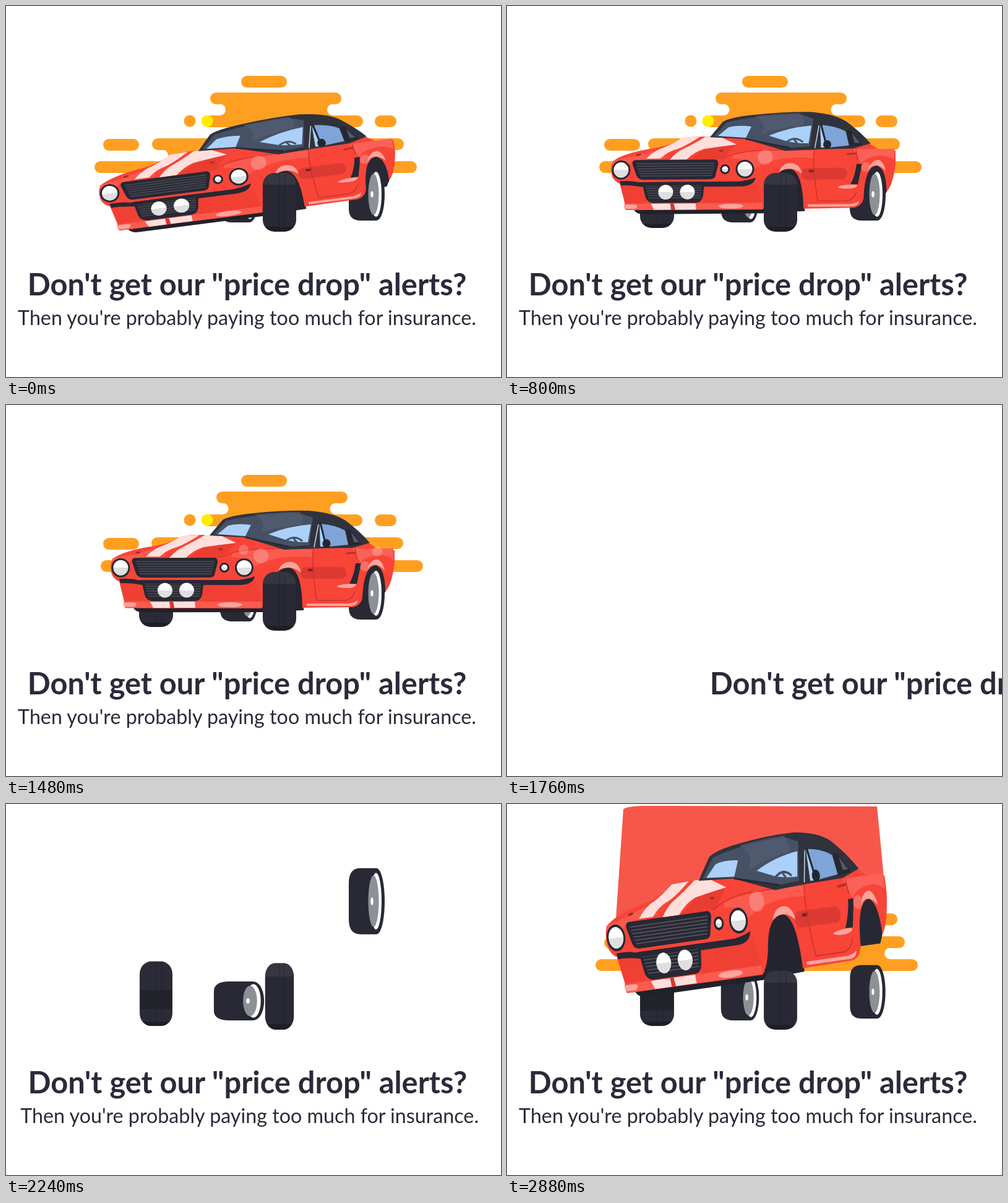
Recreate the animation shown at these times as an HTML page. Size 800 px wide and 600 px high, loop 2920 ms.

```html
<!DOCTYPE html>
<html lang="en">
<head>
<meta charset="utf-8">
<title>Price drop alerts</title>
<style>
html, body { margin: 0; width: 100%; height: 100%; overflow: hidden; background: #fff }
svg { display: block; width: 800px; height: 600px }
text { font-family: Lato, sans-serif; fill: #2b2a3a; text-anchor: middle }
</style>
</head>
<body>
<svg viewBox="0 0 800 600">
<defs>
  <clipPath id="stage"><path d="M0 2H800V600H0Z"/></clipPath>
  <linearGradient id="near" x2="0" y2="1">
    <stop offset=".2" stop-color="#363641"/><stop offset=".2" stop-color="#282934"/>
    <stop offset=".92" stop-color="#282934"/><stop offset=".92" stop-color="#1e1e28"/>
  </linearGradient>
  <linearGradient id="far" x2="0" y2="1">
    <stop offset=".44" stop-color="#2a2b36"/><stop offset=".44" stop-color="#23232c"/>
    <stop offset=".74" stop-color="#23232c"/><stop offset=".74" stop-color="#2a2b36"/>
    <stop offset=".93" stop-color="#2a2b36"/><stop offset=".93" stop-color="#1e1e28"/>
  </linearGradient>
  <linearGradient id="lamp" x2="0" y2="1">
    <stop offset=".5" stop-color="#fff"/><stop offset=".5" stop-color="#e0dfe0"/>
  </linearGradient>
  <pattern id="slats" width="10" height="4" patternUnits="userSpaceOnUse">
    <path d="M0 1H10" stroke="#62616b"/>
  </pattern>
</defs>
<g clip-path="url(#stage)">
  <g id="cloud" fill="#ff9f21"></g>
  <path id="trail" fill="#f7574b"/>
  <g class="car"><path fill="#272833" d="M573 312V285Q578 256 598 256Q614 262 614 300L608 312Z"/></g>
  <g id="backWheels"></g>
  <g class="car">
    <path fill="#20212b" d="M205 326H432V329L414 335H222Q208 335 205 326Z"/>
    <path fill="#24252f" d="M416 334Q420 258 456 258Q481 260 481 332Z"/>
    <path fill="#f94438" d="M330 210Q300 209 284 212Q264 225 232 229Q190 236 173 248Q167 258 171 274Q176 283 183 285L191 317Q188 324 193 328L413 329Q423 320 427 300Q432 264 456 263Q478 264 479 328L560 327Q573 325 576 312Q578 260 598 259Q613 265 613 302Q624 290 628 255V235L601 233L586 223L497 222L370 205Z"/>
    <!-- shading -->
    <path fill="#fb5b4f" d="M172 248Q215 240 235 233L260 243Q230 244 205 248L198 254Q186 245 172 253Z"/>
    <path fill="#fb5b4f" d="M365 240Q420 229 497 234V246Q440 240 400 262Q390 245 365 246Z"/>
    <path fill="#fb6156" d="M560 232H626V250Q611 240 594 244Q578 247 572 256Q566 241 560 232Z"/>
    <path fill="#e93b31" d="M185 286L222 289L226 316H191ZM318 289L390 289Q402 289 404 283L413 318H316Z" opacity=".55"/>
    <path fill="#fba59d" d="M440 268Q446 252 462 254Q475 257 477 272Q468 263 457 263Q447 263 440 268ZM584 265Q590 248 602 250Q609 254 612 268Q602 257 594 259Q588 260 584 265Z"/>
    <!-- hood -->
    <path fill="#e23a31" d="M350 247Q362 232 372 223L345 212Q320 232 294 247Z" opacity=".65"/>
    <path fill="#ffdfdc" d="M285 211L313 210Q288 226 275 230Q260 234 249 245H226Q238 233 249 229Q264 224 285 211ZM322 210H345L372 223Q338 227 319 230Q303 235 291 247H264Q275 234 287 229Q302 222 322 210Z"/>
    <path fill="none" stroke="#c8342d" d="M346 247Q370 235 400 233L497 232"/>
    <path stroke="#a52d2a" stroke-width="3" stroke-linecap="round" d="M211 239L216 238M345 233H349"/>
    <!-- cabin -->
    <path fill="#30333d" d="M329 211L350 186Q360 179 400 175Q450 170 490 171Q529 174 549 187Q573 205 588 223L560 231L497 232L450 234L385 214Z"/>
    <path fill="#465165" d="M336 209L356 187Q402 176 475 175L496 182L490 227L455 229L388 213Z"/>
    <path fill="#566073" opacity=".65" d="M402 177Q444 173 474 173Q485 185 478 193Q440 196 411 207Q424 190 402 177Z"/>
    <path fill="#abd1fa" d="M342 209L359 195Q374 191 396 194L387 212ZM424 209Q455 196 493 193L488 222Q468 222 452 218Z"/>
    <path fill="none" stroke="#465165" stroke-width="3" d="M452 220Q466 209 479 220M465 216L470 222"/>
    <path stroke="#262730" stroke-width="2" d="M386 214L458 229"/>
    <path fill="#7fa5d8" d="M507 192Q532 194 548 203L553 226L522 229H508Z"/>
    <path fill="#abd1fa" d="M507 196L517 224L522 229H508Z"/>
    <path fill="none" stroke="#c6d9ec" stroke-width="1.5" d="M505 193L498 230"/>
    <path stroke="#262730" stroke-width="3" d="M508 190L516 223"/>
    <ellipse cx="518" cy="224" rx="6.500" ry="7" fill="#262730"/>
    <path fill="#262730" d="M549 201L556 201L575 225L555 228Z"/>
    <path fill="#525968" d="M558 206L571 222L562 222Z"/>
    <!-- side -->
    <rect x="476" y="262" width="74" height="19" rx="9" fill="#dc3a32"/>
    <path fill="#7d2529" d="M488 265H498L496 269H488Z"/>
    <path fill="none" stroke="#c8342d" stroke-width="1.5" d="M497 232Q493 255 502 316H548Q561 314 564 302M564 232L567 250"/>
    <path stroke="#b8302b" stroke-width="3" stroke-linecap="round" d="M551 240L564 239"/>
    <path fill="#262833" d="M565 256H574L567 289H555Q563 274 565 256Z"/>
    <path fill="#fba59d" d="M534 293Q548 288 566 290Q565 296 550 296Q537 296 534 293ZM486 321H553Q564 320 568 316Q568 325 555 325H486Z"/>
    <!-- front -->
    <path fill="#272833" d="M183 281Q203 280 213 283H375Q393 281 402 277Q400 290 380 291H222Q198 287 185 288Z"/>
    <path fill="#272833" d="M208 247H338Q343 249 342 255L337 275Q335 279 328 279H221Q213 279 210 272L204 254Q203 248 208 247Z"/>
    <path fill="url(#slats)" d="M209 251H337L332 275H217Z"/>
    <path fill="#272833" d="M219 283H320L317 307Q315 317 305 317H237Q226 316 224 306Z"/>
    <path fill="url(#slats)" d="M224 289H315L313 310H230Z"/>
    <g fill="url(#lamp)">
      <circle cx="257" cy="299.500" r="12"/><circle cx="292" cy="299.500" r="12"/>
      <g stroke="#272833" stroke-width="3">
        <ellipse cx="185.500" cy="263" rx="13.500" ry="14"/><circle cx="385" cy="263" r="13.500"/>
        <circle cx="353" cy="263" r="6.500"/>
      </g>
    </g>
    <path fill="#fb5b4f" d="M193 318H413V328H193Z"/>
    <path fill="#ffdfdc" d="M233 318H265V328H238ZM270 318H305L306 328H272Z"/>
    <path fill="#d9362f" d="M264 318H270L272 328H266Z"/>
    <path fill="#fba59d" d="M191 319H207Q215 321 207 326H192Q188 323 191 319Z"/>
    <ellipse cx="362" cy="323" rx="20" ry="4" fill="#fba59d"/>
    <g fill="#fff" opacity=".22">
      <circle id="glint" cx="418" cy="244" r="12"/><circle cx="580" cy="261" r="8"/>
      <g id="late"><circle cx="384" cy="234" r="8"/><circle cx="600" cy="237" r="8"/><circle cx="412" cy="244" r="5"/></g>
    </g>
  </g>
  <g id="frontWheel"></g>
</g>
<text id="head" y="467.500" font-size="48.800" font-weight="700">Don't get our "price drop" alerts?</text>
<text id="sub" y="516" font-size="32.250">Then you're probably paying too much for insurance.</text>
</svg>
<script>
const LOOP = 2920, CUT = 1660, CLOUD_IN = 2360, CAR_IN = 2770, HIT = 2880;
const $ = id => document.getElementById(id);
const clamp = v => Math.min(1, Math.max(0, v));
const easeOut = v => 1 - (1 - clamp(v)) ** 3;
const smooth = v => (v = clamp(v)) * v * (3 - 2 * v);
const mix = (a, b, p) => a + (b - a) * p;

// Wheels: box, landing time, shading or hub
const tyre = (x, y, w, h, fill) =>
  `<rect x="${x}" y="${y}" width="${w}" height="${h}" rx="19" fill="${fill}"/>`;
const sideTyre = (x, y, w, h) =>
  `<path fill="#282934" d="M${x + 19} ${y}h${w - 33}c10 0 14 ${h * .28} 14 ${h / 2}s-4 ${h / 2} -14 ${h / 2}h${33 - w}q-19 0 -19 -19v${38 - h}q0 -19 19 -19z"/>`;
const treads = (x, y, h) =>
  `<path d="M${x} ${y + 2}v${h - 4}m9 0v${4 - h}" stroke="#1e1e28" opacity=".6"/>`;
const oval = (x, y, rx, ry, fill) => `<ellipse cx="${x}" cy="${y}" rx="${rx}" ry="${ry}" fill="${fill}"/>`;
const wheels = [
  { x: 346, y: 275, w: 61, h: 75, land: 2200, hub: 394 },
  { x: 554, y: 262, w: 58, h: 85, land: 2280, hub: 598 },
  { x: 215, y: 262, w: 55, h: 97, land: 1940, fill: 'far' },
  { x: 415, y: 270, w: 54, h: 95, land: 1994, fill: 'near' }
];
wheels.forEach((o, i) => {
  const { x, y, w, h, hub } = o, cy = y + h / 2;
  o.el = document.createElementNS('http://www.w3.org/2000/svg', 'g');
  o.el.innerHTML = hub
    ? sideTyre(x, y, w, h) + oval(hub, cy, 9, h * .43, '#fff') +
      oval(hub - 4, cy, 8.5, h * .39, '#8c9196') + oval(hub - 6.5, cy, 2.2, 5, '#fff')
    : tyre(x, y, w, h, `url(#${o.fill})`) + treads(x + w / 2, y, h);
  $(i < 3 ? 'backWheels' : 'frontWheel').append(o.el);
});

function moveWheel(o, t) {
  const base = o.y + o.h, mid = o.x + o.w / 2, wait = t - o.land;
  let sx = 1, sy = 1, dy = 0;
  if (t >= CUT) {
    if (wait < 0) {
      const p = clamp(1 + wait / 200);
      dy = -(base + 40) * (1 - p * p);
      sy = 1.26;
    } else {
      const wave = d => .58 * Math.exp(-wait / 175) * Math.sin((wait - d) * Math.PI / 160);
      sx += wave(0);
      sy -= wave(23);
    }
  }
  o.el.setAttribute('transform',
    `translate(${mid} ${base + dy}) scale(${sx} ${sy}) translate(${-mid} ${-base})`);
}

// Cloud rows drift sideways on their own
const rows = [[330, 542], [318, 577], [236, 643], [143, 664]];
const notches = [[355, 519], [372, 555], [262, 610]];
const driftAt = [0, 400, 800, 1480];
const drifts = [[0, -1, 7, 10], [0, 5, 2, -1], [0, -6, -8, -1], [0, 4, 6, 10]];
function drift(keys, t) {
  if (t >= CUT) return 0;
  const i = t < 400 ? 0 : t < 800 ? 1 : 2;
  return mix(keys[i], keys[i + 1], smooth((t - driftAt[i]) / (driftAt[i + 1] - driftAt[i])));
}
const pill = (l, r, y, h = 19, fill = '') =>
  `<rect x="${l}" y="${y}" width="${r - l}" height="${h}" rx="${h / 2}" ${fill && `fill="${fill}"`}/>`;
const grown = (x, p, body, tall = 0) => p <= 0 ? '' :
  `<g transform="translate(${x[0]} ${x[1]}) scale(${p} ${1 + tall * (1 - p)}) translate(${-x[0]} ${-x[1]})">${body}</g>`;

function drawCloud(t) {
  if (t >= CUT && t < CLOUD_IN) return '';
  const since = start => t < CUT ? 1 : easeOut((t - start) / 200);
  const late = start => t < CUT ? 1 : smooth((t - start) / 180);
  const off = drifts.map(k => drift(k, t));
  const at = rows.map(([l, r], i) => [l + off[i], r + off[i]]);
  let main = '';
  notches.forEach(([l, r], i) => {
    const d = (off[i] + off[i + 1]) / 2, y = 158.5 + 37 * i;
    const a = Math.max(at[i][0], at[i + 1][0]) + 9, b = Math.min(at[i][1], at[i + 1][1]) - 9;
    main += `<path d="M${a} ${y - 9}H${b}V${y + 28}H${a}Z"/>` +
      pill(a - 40, l + d, y, 18.5, '#fff') + pill(r + d, b + 40, y, 18.5, '#fff');
  });
  at.forEach(([l, r], i) => main += pill(l, r, 140 + 37 * i));
  return grown([406, 200], since(CLOUD_IN), main) +
    grown([417, 122], since(2410), pill(380, 454, 113)) +
    grown([186, 224.5], late(2485), pill(157, 215, 215), .35) +
    grown([613, 186], late(2460), pill(596, 631, 177), .35) +
    grown([297, 186], late(2560), '<circle cx="297" cy="186" r="9.500"/>') +
    grown([325, 186], late(2530), '<circle cx="325" cy="186" r="9.500" fill="#ffed00"/>');
}

// Car pose: differences from the resting matrix
const rest = [1, 0, 0, 1, 0, 0];
const squash = [.045, -.135, .13, -.06, -60.5, 80.8];
const stretch = [-.01, -.14, .17, .4, -51.9, -128];
const cars = document.querySelectorAll('.car');

function drawCar(t) {
  const falling = t >= CAR_IN, shown = t < CUT || falling;
  const drop = falling ? Math.min(0, (t - HIT) * 2.75) : 0;
  const bend = falling
    ? stretch.map((v, i) => mix(v, squash[i], clamp((t - HIT) / 40)))
    : squash.map(v => v * Math.exp(-t / 280));
  const m = rest.map((v, i) => v + bend[i]);
  m[5] += drop;
  cars.forEach(c => {
    c.style.display = shown ? '' : 'none';
    c.setAttribute('transform', `matrix(${m})`);
  });
  const y = v => Math.max(4, v + drop);
  $('trail').style.display = falling ? '' : 'none';
  $('trail').setAttribute('d',
    `M188 9Q190 4 220 3L598 4L613 ${y(160)}V${y(185)}L608 ${y(208)}L400 ${y(215)}L175 ${y(200)}Z`);
  const glow = t < CUT ? smooth((t - 900) / 500) : 0;
  $('late').setAttribute('opacity', glow);
  $('glint').setAttribute('cx', 418 - 6 * glow);
}

function slide(id, t, start) {
  const x = t < CUT ? 0 : t < start ? 800 : 800 * Math.exp(-(t - start) * .0124);
  $(id).setAttribute('x', 389.5 + x);
}

function draw(now) {
  const t = now % LOOP;
  $('cloud').innerHTML = drawCloud(t);
  wheels.forEach(o => moveWheel(o, t));
  drawCar(t);
  slide('head', t, 1680);
  slide('sub', t, 1816);
}
const begin = performance.now();
function tick() {
  draw(performance.now() - begin);
  requestAnimationFrame(tick);
}
tick();
</script>
</body>
</html>
```
